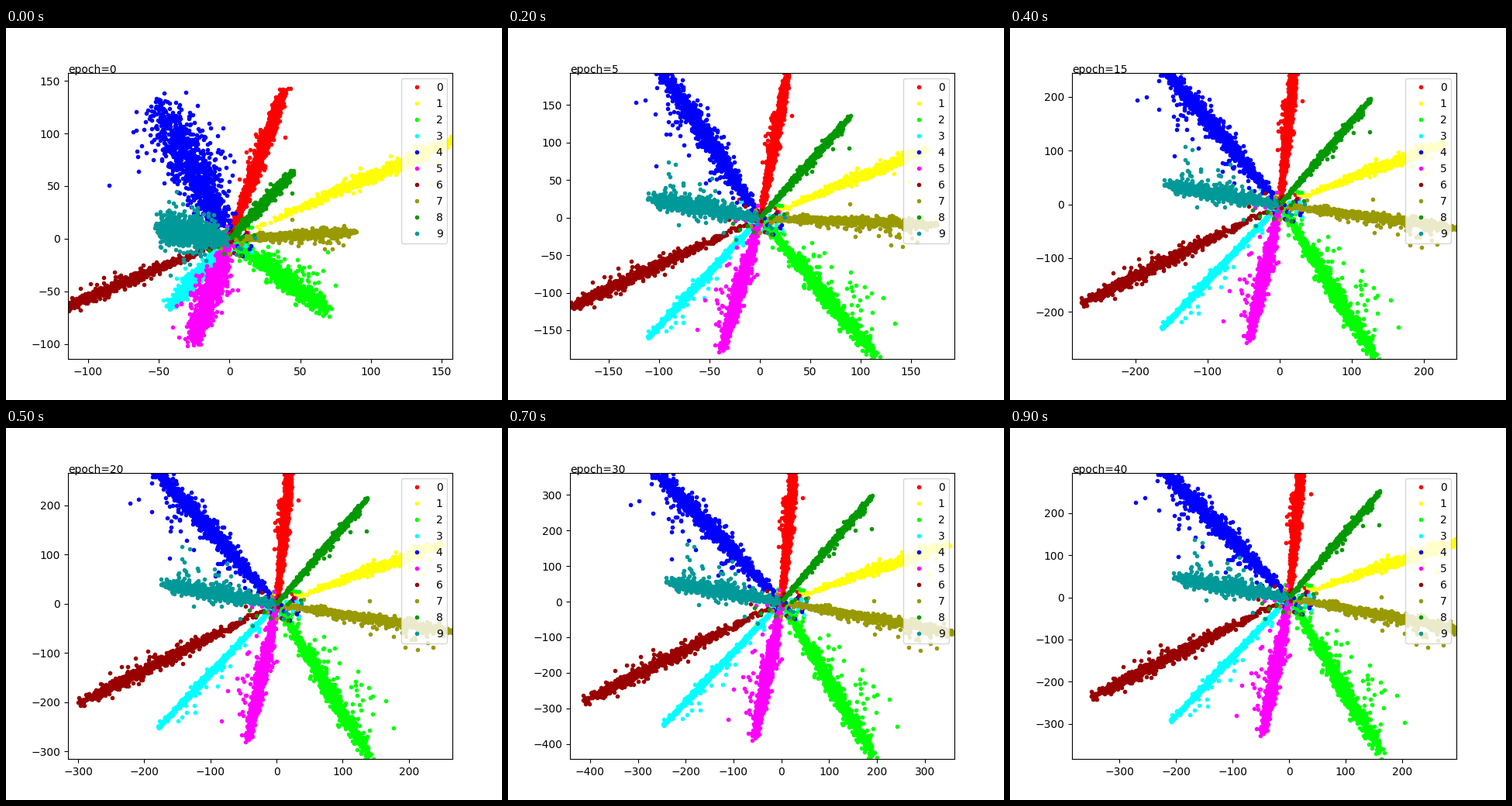
A matplotlib script that plays this animation: 640x480 px, repeating every 1 s.

```python
import matplotlib.pyplot as plt
import numpy as np
from matplotlib.animation import FuncAnimation

FRAME_MS = 100
EPOCHS = [0, 1] + list(range(5, 41, 5))
# Axis limits, the same for x and y, at a few epochs.
LIMITS = {0: (-114.2, 157.7), 1: (-155.1, 177.4), 5: (-188.5, 193.2),
          10: (-260, 223.9), 20: (-315.4, 266), 30: (-442, 362), 40: (-383.8, 296)}
ASPECT = 369.6 / 496  # vertical to horizontal pixels per data unit
POINTS = 1000

plt.rcParams["font.family"] = "DejaVu Sans"
fig, ax = plt.subplots(figsize=(6.4, 4.8), dpi=100)


def settle(ends, epoch, pace):
    """Move from the first value towards the last, slowing down as training goes on."""
    start, end = ends
    return end + (start - end) * np.exp(-epoch / pace)


def limits_at(epoch):
    return [np.interp(epoch, list(LIMITS), ends) for ends in zip(*LIMITS.values())]


class Ray:
    """One class of features: a cloud along a line that turns, grows and narrows."""

    def __init__(self, label, color, angles, lengths, widths, stray, pace=5, crowd=2):
        rng = np.random.default_rng(100 + label)
        self.angles, self.lengths, self.widths = angles, lengths, widths
        self.pace = pace
        self.along = rng.beta(crowd, 2, POINTS)
        self.along /= self.along.max()
        self.across = rng.standard_t(5, POINTS) * (0.1 + self.along) * (1.4 - self.along) / 0.56

        # Strays lean to one side of the ray; their sign tells which.
        count = round(450 * abs(stray))
        self.stray_along = rng.uniform(0.1, 0.9, count)
        self.stray_across = 1.6 * stray * self.stray_along * np.abs(rng.normal(size=count))
        self.lost = rng.normal(scale=0.035, size=(2, 12))
        self.line, = ax.plot([], [], ".", color=color, label=str(label))

    def update(self, epoch, span):
        angle = np.radians(settle(self.angles, epoch, self.pace))
        length = span * settle(self.lengths, epoch, 2)
        width = settle(self.widths, epoch, 2)
        x, y = length * np.cos(angle), length * np.sin(angle)
        along = np.append(self.along, self.stray_along)
        across = np.append(self.across * width, self.stray_across)
        lost_x, lost_y = self.lost * span
        self.line.set_data(np.append(along * x - across * y * ASPECT, lost_x),
                           np.append(along * y + across * x / ASPECT, lost_y))


rays = [
    Ray(0, "#ff0000", (74.6, 86), (0.55, 0.52), (0.015, 0.011), 0.04),
    Ray(1, "#ffff00", (30.5, 23), (0.68, 0.48), (0.008, 0.008), 0.03, pace=20, crowd=4),
    Ray(2, "#00ff00", (-44, -66), (0.37, 0.61), (0.030, 0.015), 0.12),
    Ray(3, "#00ffff", (-123.6, -125.5), (0.29, 0.53), (0.023, 0.005), 0.06),
    Ray(4, "#0000ff", (111, 127), (0.53, 0.62), (0.062, 0.016), 0.11, pace=12),
    Ray(5, "#ff00ff", (-104.7, -98), (0.39, 0.49), (0.040, 0.015), -0.10, pace=10),
    Ray(6, "#990000", (-151, -146), (0.53, 0.62), (0.009, 0.009), -0.04, crowd=3),
    Ray(7, "#999900", (4.5, -14.5), (0.33, 0.475), (0.013, 0.010), -0.06, pace=10),
    Ray(8, "#009900", (55, 57.5), (0.29, 0.44), (0.016, 0.006), -0.05),
    Ray(9, "#009999", (167, 167), (0.20, 0.31), (0.085, 0.020), -0.12),
]
ax.legend(loc="upper right")
caption = ax.text(0, 1, "", transform=ax.transAxes)


def draw(frame):
    epoch = EPOCHS[frame]
    low, high = limits_at(epoch)
    ax.set(xlim=(low, high), ylim=(low, high))
    for ray in rays:
        ray.update(epoch, high - low)
    caption.set_text(f"epoch={epoch}")
    return [ray.line for ray in rays] + [caption]


anim = FuncAnimation(fig, draw, frames=len(EPOCHS), interval=FRAME_MS, repeat=True)
plt.show()
```
